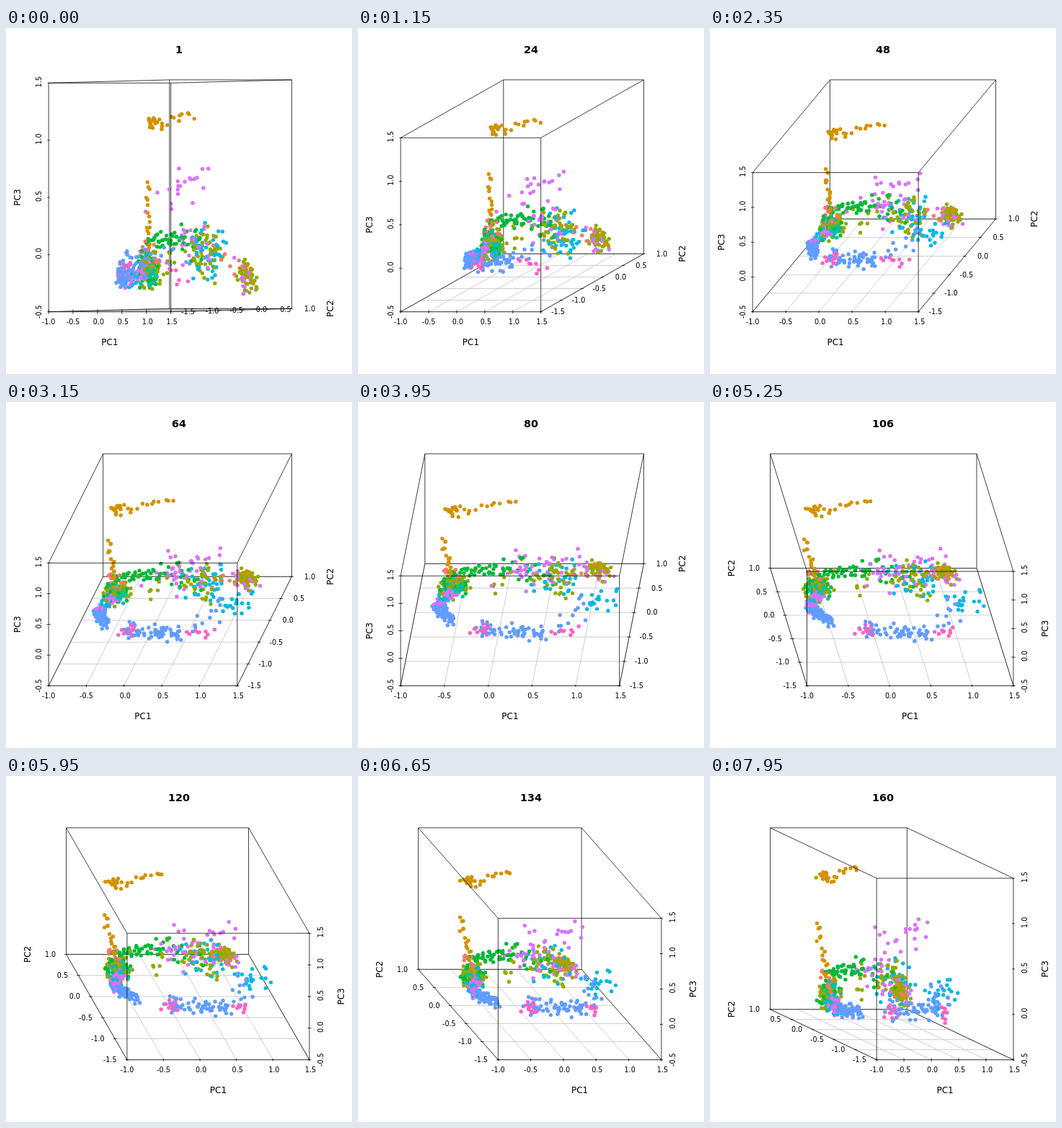
An HTML page with a canvas for the animation above (8 s loop, 480 by 480 pixels).

```html
<!DOCTYPE html>
<html lang="en">
<head>
<meta charset="utf-8">
<title>Turning 3D scatter plot</title>
<style>
  html, body { margin: 0; width: 100%; height: 100%; overflow: hidden; background: #fff; }
  canvas { display: block; width: 480px; height: 480px; }
</style>
</head>
<body>
<canvas id="plot" width="480" height="480"></canvas>
<script>
const ctx = document.getElementById('plot').getContext('2d');

const STEP_MS = 50, STEPS = 160;
const NX = 5, NY = 5, NZ = 4;             // box size in half-unit ticks
const BOX_W = 337.3, BOX_H = 321.78, BASE = 393.69;
const LEFT = 59.11, RIGHT = 420.89;

let seed = 7;
function random() {
  seed = (seed + 0x6D2B79F5) | 0;
  let t = Math.imul(seed ^ (seed >>> 15), 1 | seed);
  t = (t + Math.imul(t ^ (t >>> 7), 61 | t)) ^ t;
  return ((t ^ (t >>> 14)) >>> 0) / 4294967296;
}
const noise = () => (random() + random() - 1) * 2;

const points = [];

// Scatters points of one colour around the line from a to b.
function scatter(color, count, spread, a, b = a) {
  for (let i = 0; i < count; i++) {
    const t = (i + .5) / count;
    const [x, y, z] = a.map((v, k) => v + (b[k] - v) * t + noise() * spread);
    points.push({ color, x, y, z, order: random() });
  }
}

// Landmarks of the data, in ticks along PC1, PC2 and PC3.
const hub = [.85, 3.3, .7], shoulder = [.75, 3.3, 1.15], ridge = [2.1, 3.4, 1.25];
const mid = [3.2, 3.35, 1], east = [4.05, 4.1, .6], southEast = [4.25, 2.4, .9];
const front = [.6, 2.65, .53], foot = [.87, 2, .62];
const southWest = [1.65, 1.5, .75], south = [3.2, 1.15, .92], southRim = [3.9, 1.8, .5];
const neck = [.58, 3.5, 2.25], peak = [.8, 3.5, 3.22], tip = [2.3, 3.7, 3.4];
const crestWest = [1.9, 2.6, 2.05], crestEast = [3.9, 2.45, 2.3];

const salmon = '#F8766D', orange = '#D39200', olive = '#93AA00', green = '#00BA38', teal = '#00C19F';
const cyan = '#00B9E3', blue = '#619CFF', violet = '#DB72FB', pink = '#FF61C3';

scatter(orange, 16, .1, peak);
scatter(orange, 13, .07, peak, tip);
scatter(orange, 20, .05, hub, neck);
scatter(orange, 14, .13, east);
scatter(salmon, 14, .13, shoulder, hub);
scatter(salmon, 6, .15, mid, east);
scatter(olive, 40, .2, hub);
scatter(olive, 14, .25, hub, mid);
scatter(olive, 36, .3, mid);
scatter(olive, 50, .17, east);
scatter(green, 40, .17, hub);
scatter(green, 42, .11, shoulder, ridge);
scatter(green, 16, .17, ridge, mid);
scatter(teal, 65, .16, hub);
scatter(cyan, 32, .32, mid);
scatter(cyan, 18, .24, southEast);
scatter(cyan, 25, .13, front, hub);
scatter(violet, 40, .12, front, hub);
scatter(violet, 24, .25, ridge, mid);
scatter(violet, 16, .2, east);
scatter(violet, 20, .25, crestWest, crestEast);
scatter(blue, 75, .09, front, foot);
scatter(blue, 55, .14, southWest, south);
scatter(blue, 14, .2, south, southEast);
scatter(pink, 14, .12, southWest);
scatter(pink, 9, .1, south, southRim);
points.sort((p, q) => p.order - q.order);

// Labels share one width, so positive values carry a leading space.
function tickLabel(value) {
  return (value < 0 ? '' : '\u00a0') + value.toFixed(1);
}

function text(str, x, y, { size = 9.6, align = 'center', bold = false, turned = false } = {}) {
  ctx.save();
  ctx.translate(x, y);
  if (turned) ctx.rotate(-Math.PI / 2);
  ctx.font = `${bold ? 'bold ' : ''}${size}px "DejaVu Sans", sans-serif`;
  ctx.textAlign = align;
  ctx.fillText(str, 0, 0);
  ctx.restore();
}

function draw(angle) {
  const a = angle / 90;
  const mirrored = a > 1;
  const shift = 1 - a;
  const lift = mirrored ? 2 - a : a;
  const sx = BOX_W / (NX + NY * Math.abs(shift));
  const sz = BOX_H / (NZ + NY * lift);
  const x0 = mirrored ? RIGHT - NX * sx : LEFT;
  const project = (x, y, z) => [x0 + sx * (x + y * shift), BASE - sz * (z + y * lift)];

  const stroke = (p, q) => {
    ctx.beginPath();
    ctx.moveTo(...p);
    ctx.lineTo(...q);
    ctx.stroke();
  };
  const edge = (p, q) => stroke(project(...p), project(...q));
  const tick = ([x, y], dx, dy) => stroke([x - dx, y - dy], [x + dx, y + dy]);

  ctx.fillStyle = '#fff';
  ctx.fillRect(0, 0, 480, 480);
  ctx.lineWidth = .75;

  ctx.strokeStyle = '#bebebe';
  for (let i = 0; i <= NX; i++) edge([i, 0, 0], [i, NY, 0]);
  for (let i = 0; i <= NY; i++) edge([0, i, 0], [NX, i, 0]);

  // Floor and back wall go behind the points.
  ctx.strokeStyle = ctx.fillStyle = '#000';
  for (const y of [0, NY]) edge([0, y, 0], [NX, y, 0]);
  for (const x of [0, NX]) {
    edge([x, 0, 0], [x, NY, 0]);
    edge([x, NY, 0], [x, NY, NZ]);
  }
  edge([0, NY, NZ], [NX, NY, NZ]);

  const yEdge = mirrored ? 0 : NX, zEdge = NX - yEdge;
  const tickW = .05 * sx, tickH = .04 * sz;
  for (let i = 0; i <= NX; i++) {
    const p = project(i, 0, 0);
    tick(p, 0, tickH);
    text(tickLabel(i / 2 - 1), p[0], 411);
  }
  for (let i = 0; i <= NY; i++) {
    const p = project(yEdge, i, 0);
    tick(p, tickW, 0);
    text(tickLabel(i / 2 - 1.5), p[0] + (mirrored ? -14.4 : 14.4), Math.round(p[1] + 3.4),
      { align: mirrored ? 'right' : 'left' });
  }
  for (let i = 0; i <= NZ; i++) {
    const p = project(zEdge, 0, i);
    tick(p, tickW, 0);
    text(tickLabel(i / 2 - .5), mirrored ? 440 : 49, p[1], { turned: true });
  }

  text(String(angle), 240, 35, { size: 14.4, bold: true });
  text('PC1', project(NX / 2, 0, 0)[0], 440, { size: 12 });
  text('PC2', mirrored ? 34 : 454, project(0, NY, 0)[1], { size: 12, turned: true });
  text('PC3', mirrored ? 469 : 20, project(0, 0, NZ / 2)[1], { size: 12, turned: true });

  for (const p of points) {
    const [px, py] = project(p.x, p.y, p.z);
    ctx.fillStyle = p.color;
    ctx.beginPath();
    ctx.arc(px, py, 2.7, 0, 2 * Math.PI);
    ctx.fill();
  }

  // Front face and top edges lie over the points.
  edge([0, 0, NZ], [NX, 0, NZ]);
  for (const x of [0, NX]) {
    edge([x, 0, 0], [x, 0, NZ]);
    edge([x, 0, NZ], [x, NY, NZ]);
  }
}

let shown = 0;
function update() {
  const angle = Math.floor(performance.now() / STEP_MS) % STEPS + 1;
  if (angle !== shown) draw(shown = angle);
  requestAnimationFrame(update);
}
update();
</script>
</body>
</html>
```
